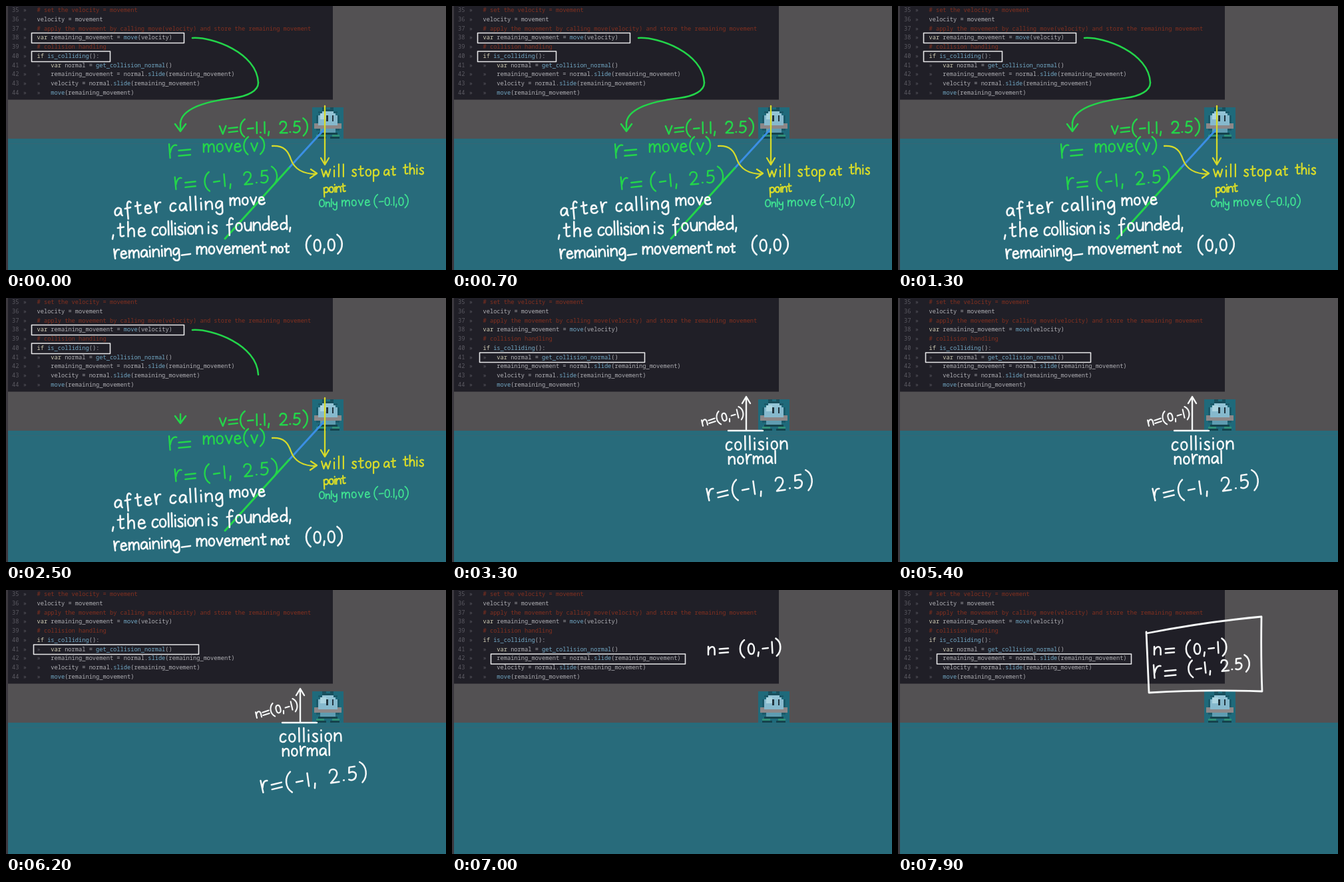
Animation of 661x396 px, one loop 8000 ms. Source, as an HTML page:

```html
<!DOCTYPE html>
<html lang="en">
<head>
<meta charset="utf-8">
<title>Collision normal notes</title>
<style>
  html, body { margin: 0; width: 100%; height: 100%; overflow: hidden; background: #535153; }
  svg { display: block; width: 661px; height: 396px; }
  .code text { font: 8.7px "Noto Sans Mono", "DejaVu Sans Mono", monospace; white-space: pre; fill: #b0b0b5; }
  .code .num, .code .tab { fill: #5b5a62; }
  .code .note { fill: #84301f; }
  .code .key { fill: #d2cfb6; }
  .code .fn { fill: #72a9c6; }
  .ink path { fill: none; stroke-linecap: round; stroke-linejoin: round; }
</style>
</head>
<body>
<svg id="stage" viewBox="0 0 661 396">
  <rect width="661" height="396" fill="#535153"/>
  <rect y="199" width="661" height="197" fill="#286b7b"/>
  <path d="M3 206.5H661" stroke="#4b6068" stroke-width="1" opacity=".35"/>
  <rect width="3" height="396" fill="#3c393f"/>
  <rect x="3" width="488" height="140.5" fill="#201f27"/>
  <g id="code" class="code"></g>
  <g id="hero" shape-rendering="crispEdges"></g>
  <g id="ink" class="ink"></g>
</svg>
<script>
const LOOP = 8000, STEP = 100;
const GREEN = '#23d54a', WHITE = '#f6f8f8', YELLOW = '#d6da2a', MINT = '#3fe091', BLUE = '#3b8fe4';

const svg = (parent, tag, attrs = {}, text) => {
  const el = document.createElementNS('http://www.w3.org/2000/svg', tag);
  for (const k in attrs) el.setAttribute(k, attrs[k]);
  if (text !== undefined) el.textContent = text;
  return parent.appendChild(el);
};
const byId = id => document.getElementById(id);

// Code panel: number of extra tabs, then the line.
const lines = [
  [0, '# set the velocity = movement'],
  [0, 'velocity = movement'],
  [0, '# apply the movement by calling move(velocity) and store the remaining movement'],
  [0, 'var remaining_movement = move(velocity)'],
  [0, '# collision handling'],
  [0, 'if is_colliding():'],
  [1, 'var normal = get_collision_normal()'],
  [1, 'remaining_movement = normal.slide(remaining_movement)'],
  [1, 'velocity = normal.slide(remaining_movement)'],
  [1, 'move(remaining_movement)']
];
lines.forEach(([tabs, line], i) => {
  const y = 9.3 + i * 13.73, code = byId('code');
  svg(code, 'text', { x: 9, y, class: 'num' }, 35 + i);
  for (let t = 0; t <= tabs; t++) svg(code, 'text', { x: 25.7 + t * 20.8, y, class: 'tab' }, '»');
  const row = svg(code, 'text', { x: 46.5 + tabs * 20.8, y });
  const parts = line[0] === '#' ? [line] : line.split(/(\b(?:var|if)\b|\w+(?=\())/);
  for (const part of parts) {
    const kind = part[0] === '#' ? 'note' : /^(var|if)$/.test(part) ? 'key'
      : /^(move|slide|is_colliding|get_collision_normal)$/.test(part) ? 'fn' : '';
    svg(row, 'tspan', { class: kind }, part);
  }
});

// Small pixel figure: colour, x, y, width, height on a 3 px grid.
const blocks = [
  ['#1f6a7b', 0, 0, 16, 16],
  ['#184f5d', 5, 0, 2, 1], ['#184f5d', 9, 0, 2, 1], ['#184f5d', 5, 1, 6, 1],
  ['#1b5969', 3, 2, 10, 1], ['#1b5969', 2, 4, 12, 8],
  ['#93c4d6', 5, 2, 6, 1], ['#93c4d6', 4, 3, 8, 1], ['#86b9cd', 3, 4, 10, 5],
  ['#abd4e0', 4, 3, 3, 3],
  ['#21343e', 7, 4, 1, 3], ['#21343e', 10, 4, 1, 3],
  ['#8c8788', 1, 8, 2, 3], ['#8c8788', 3, 9, 10, 2], ['#8c8788', 13, 8, 2, 3],
  ['#5f9cb1', 4, 11, 8, 2],
  ['#15434d', 3, 13, 10, 1], ['#2f8f78', 2, 14, 4, 1], ['#2f8f78', 10, 14, 4, 1],
  ['#15434d', 2, 15, 5, 1], ['#15434d', 9, 15, 5, 1]
];
for (const [fill, x, y, w, h] of blocks)
  svg(byId('hero'), 'rect', { fill, x: 460 + x * 2.95, y: 152 + y * 2.95, width: w * 2.95, height: h * 2.95 });

// Pen letters: width and strokes, baseline at 0, x-height 10.
const pen = {
  a: [8, 'M8-8C4-12 0-8 0-4C0 2 6 0 8-7L8-1L9 0'],
  c: [7, 'M7-9C3-12 0-8 0-4C0 1 5 1 7-2'],
  d: [8, 'M8-6C5-10 0-8 0-3C0 2 7 0 8-5L8-17L8 0'],
  e: [8, 'M0-5L7-6C7-11 0-12 0-4C0 1 6 1 8-2'],
  f: [8, 'M8-15C5-19 3-15 3-10L3 5M0-8L7-9'],
  g: [8, 'M8-8C4-12 0-8 0-4C0 1 6 0 8-8L8 3C8 8 2 8 0 4'],
  h: [7, 'M0-17L0 0M0-5C3-12 7-10 7-5L7 0'],
  i: [2, 'M1-9L1 0M1-14L1-13.5'],
  l: [2, 'M1-17L1 0'],
  m: [13, 'M0-10L0 0M0-5C3-12 6-11 6-6L6 0M6-5C9-12 13-11 13-5L13 0'],
  n: [8, 'M0-10L0 0M0-5C3-12 8-11 8-5L8 0'],
  o: [8, 'M4-10C-1-10-1 0 4 0C9 0 9-10 4-10'],
  p: [8, 'M0-9L0 8M0-7C3-12 8-10 8-5C8 0 3 1 0-2'],
  r: [6, 'M0-13L1 0M1-5C2-10 4-13 7-12'],
  s: [6, 'M6-9C3-11 0-9 1-7C2-5 6-5 6-2C6 1 2 1 0-1'],
  t: [7, 'M3-15L3-2C3 0 5 0 7-1M0-10L7-11'],
  u: [8, 'M0-10C0-2 1 0 4 0C7 0 8-4 8-10L8 0'],
  v: [8, 'M0-10L4 0L8-10'],
  w: [12, 'M0-10L3 0L6-8L9 0L12-10'],
  y: [8, 'M0-10C0-3 7-2 8-10L8 3C7 8 2 8 0 4'],
  O: [11, 'M5-15C-2-15-2 0 5 0C12 0 12-15 5-15'],
  0: [8, 'M4-13C-1-13-1 0 4 0C9 0 9-13 4-13'],
  1: [2, 'M1-14L1 0'],
  2: [9, 'M0-11C1-16 8-15 8-10C8-6 3-3 0 0L9 0'],
  5: [9, 'M8-14L2-14L1-8C6-10 9-7 8-4C7 0 3 1 0-1'],
  '(': [6, 'M6-18C-1-13-2-2 5 4'],
  ')': [6, 'M0-18C7-13 7-2 0 4'],
  '=': [11, 'M0-7L11-8M0-2L11-3'],
  '-': [7, 'M0-6L7-6.5'],
  '.': [1, 'M0-1L.5-1'],
  ',': [2, 'M1-2L0 3'],
  _: [12, 'M0 0L12-1'],
  ' ': [6, '']
};

const shows = [];
const layer = (on, off) => {
  const g = svg(byId('ink'), 'g');
  shows.push({ g, on, off });
  return g;
};
const stroke = (g, color, width, d) => svg(g, 'path', { d, stroke: color, 'stroke-width': width });
const frame = (g, x, y, w, h) => stroke(g, '#e6e6e8', 1.6, `M${x} ${y}h${w}v${h}h${-w}z`);

function write(g, color, width, words) {
  for (const [text, x, y, size, gap, tilt = 0] of words) {
    const word = svg(g, 'g', { transform: `translate(${x} ${y}) rotate(${tilt}) scale(${size})` });
    let at = 0;
    for (const ch of text) {
      const [w, d] = pen[ch];
      if (d) svg(word, 'path', { d, transform: `translate(${at} 0)`, stroke: color, 'stroke-width': width / size });
      at += w + gap;
    }
  }
}

// First board: remaining movement
const tail = layer(0, 2500);
stroke(tail, GREEN, 2.5, 'M379 115C379 127 364 135 342 138C300 143 265 153 262 175');

const call = layer(0, 2600);
stroke(call, GREEN, 2.5, 'M280 48C310 46 377 70 379 115');
stroke(call, GREEN, 2.5, 'M254 177L262 188L270 177M262 174V188');

const values = layer(0, 2700);
frame(values, 38.5, 40.5, 229, 15);
frame(values, 38.5, 68, 118, 15.5);
stroke(values, BLUE, 3, 'M479 184L425 243');
stroke(values, GREEN, 3, 'M425 243L329 349');
write(values, GREEN, 2.4, [
  ['v=(-1.1, 2.5)', 321, 192, 1.2, 3.4, -1],
  ['r=', 245, 228, 1.6, 3],
  ['move(v)', 297, 219, 1.2, 3.3, -1],
  ['r=', 254, 275, 1.4, 5, -1],
  ['(-1, 2.5)', 299, 273, 1.3, 4.6, -5]
]);
stroke(values, YELLOW, 2.3, 'M479 150V237M473 228L479 238L485 228');
stroke(values, YELLOW, 2.3, 'M400 210C418 209 424 218 428 230C433 244 446 252 466 252M458 245L467 251L457 258');
write(values, YELLOW, 2.2, [
  ['will', 474, 256, 1.1, 4.3], ['stop', 520, 255, 1, 3.7],
  ['at', 568, 254, .9, 3.9], ['this', 597, 252, .95, 3.2],
  ['point', 478, 280, .8, 1.75, -3]
]);
write(values, MINT, 1.8, [
  ['Only', 471, 301, .7, 2.7], ['move', 505, 300, .85, 4, -1], ['(-0.1,0)', 553, 299, .9, 2.5]
]);

const remark = layer(0, 2800);
write(remark, WHITE, 2.6, [
  ['after', 164, 315, 1.2, 5, -5], ['calling', 247, 308, 1.2, 4.7, -3], ['move', 337, 299, 1.1, 3.4, -2],
  [',', 160, 346, 1.2, 0], ['the', 168, 346, 1.3, 5, -1], ['collision', 220, 344, 1.2, 2.2, -2],
  ['is', 303, 341, 1.2, 3.6], ['founded,', 332, 338, 1.2, 3.2, -2],
  ['remaining_', 163, 379, 1.1, 3.2, -3], ['movement', 287, 372, 1.1, 3, -1],
  ['not', 399, 370, .9, 2.9], ['(0,0)', 451, 368, 1.3, 3.1, -2]
]);

// Second board: collision normal
frame(layer(2700, 6700), 41.5, 82, 248, 14.5);
const axis = layer(2800, 6600);
stroke(axis, WHITE, 2.4, 'M415 199H467M442 198V149M436 158L442 148L448 158');
write(axis, WHITE, 2.1, [['n=(0,-1)', 377, 192, .9, 3, -13]]);
const label = layer(2900, 6600);
write(label, WHITE, 2.5, [['collision', 412, 228, 1.2, 3.9, -1], ['normal', 416, 249, 1.1, 3.9, -1]]);
const rest = layer(3000, 6700);
write(rest, WHITE, 2.5, [['r=(-1, 2.5)', 385, 304, 1.4, 4.9, -8]]);

// Third board: slide inputs
frame(layer(6700, LOOP), 58.5, 96, 292, 15);
const normal = layer(6900, LOOP);
write(normal, WHITE, 2.5, [['n=', 385, 97, 1.2, 6], ['(0,-1)', 433, 97, 1.2, 4.1, -3]]);
const move = layer(7100, LOOP);
write(move, WHITE, 2.5, [['r=', 384, 132, 1.5, 5.2], ['(-1, 2.5)', 437, 127, 1.15, 4.1, -6]]);
const ring = stroke(layer(7300, LOOP), WHITE, 2.8,
  'M373 63L377 154Q460 149 547 152Q545 100 546 40Q460 48 373 65');
const ringLength = ring.getTotalLength();
ring.setAttribute('stroke-dasharray', ringLength);

const start = performance.now();
function draw(now) {
  const time = Math.max(0, now - start) % LOOP;
  const t = Math.floor(time / STEP) * STEP;
  for (const { g, on, off } of shows) g.style.display = t >= on && t < off ? '' : 'none';
  const drawn = Math.min(1, Math.max(0, (t - 7200) / 400));
  ring.setAttribute('stroke-dashoffset', ringLength * (1 - drawn));
  requestAnimationFrame(draw);
}
draw(start);
</script>
</body>
</html>
```
